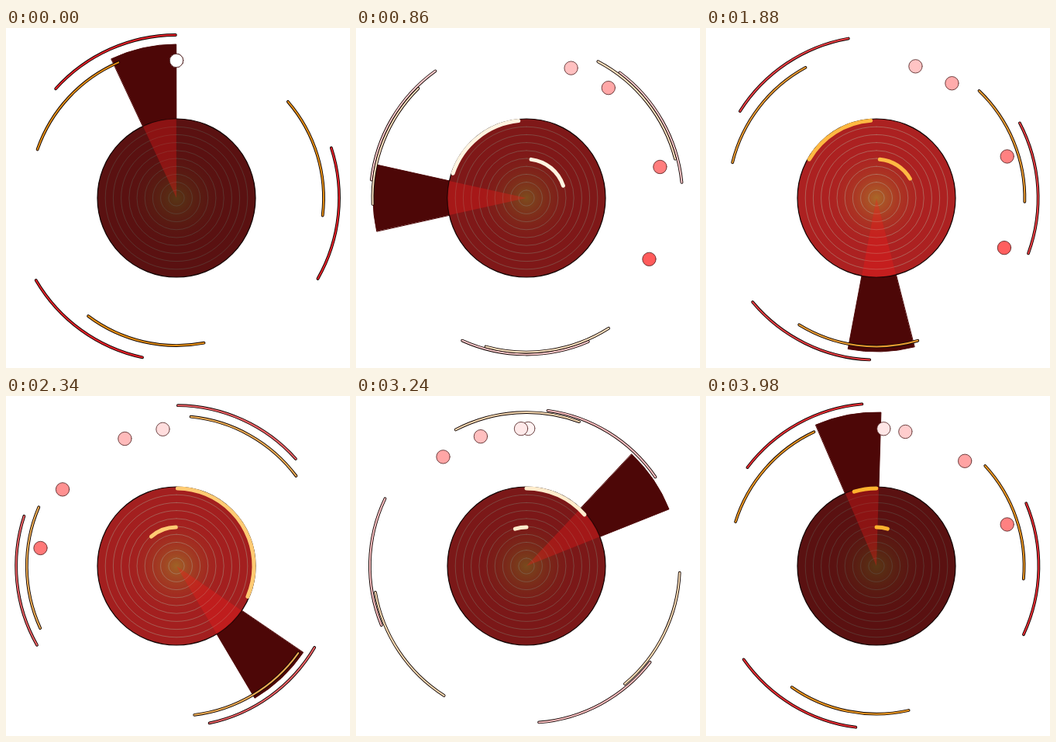
These frames come from a looping animation (444x438 px, 4000 ms). An HTML page with a canvas:

```html
<!DOCTYPE html>
<html lang="en">
<head>
<meta charset="utf-8">
<title>Radar loader</title>
<style>
  html, body { margin: 0; width: 100%; height: 100%; overflow: hidden; background: #fff; }
  canvas { display: block; }
</style>
</head>
<body>
<canvas id="stage" width="444" height="438"></canvas>
<script>
const ctx = document.getElementById('stage').getContext('2d');
const CX = 220, CY = 219, DISC = 102, SWEEP = 198;
const LOOP = 4000, BEAT = 1000, DOT_LAP = 1010, SPIN = 2 * DOT_LAP;
const DOT_DELAYS = [0, 60, 160, 240];

const rad = deg => (deg - 90) * Math.PI / 180;
const triangle = x => 1 - Math.abs(1 - 2 * x);
const mix = (a, b, k) => `rgb(${a.map((v, i) => Math.round(v + (b[i] - v) * k))})`;
const sine = x => (1 - Math.cos(Math.PI * x)) / 2;

// Cubic bezier easing with flat ends, solved by bisection
function flatBezier(x1, x2) {
  return x => {
    let lo = 0, hi = 1;
    for (let i = 0; i < 20; i++) {
      const s = (lo + hi) / 2, r = 1 - s;
      if (3 * s * r * r * x1 + 3 * s * s * r * x2 + s * s * s < x) lo = s;
      else hi = s;
    }
    return lo * lo * (3 - 2 * lo);
  };
}

// One uneven turn: early lead, soft ends and an optional second ripple
function unevenTurn(lead, soft, ripple) {
  return x => {
    const w = 2 * Math.PI * x;
    return x + lead * (1 - Math.cos(w)) - soft * Math.sin(w) - ripple * Math.sin(2 * w);
  };
}

const outerHead = flatBezier(0.46, 0.33);
const innerHead = flatBezier(0.75, 0.36);
const tail = x => sine(Math.max(0, 1.3 * (x - 0.318)));
const redTurn = unevenTurn(0.094, 0.08, 0);
const amberTurn = unevenTurn(0.155, 0.075, 0.05);

function fill(color) {
  ctx.fillStyle = color;
  ctx.fill();
}

function outline(color, width) {
  ctx.strokeStyle = color;
  ctx.lineWidth = width;
  ctx.stroke();
}

function arc(r, from, to) {
  ctx.beginPath();
  ctx.arc(CX, CY, r, rad(from), rad(to));
}

function sector(r, angle) {
  arc(r, angle - 25, angle);
  ctx.lineTo(CX, CY);
  ctx.closePath();
}

const glow = ctx.createRadialGradient(CX, CY, 0, CX, CY, 66);
glow.addColorStop(0, 'rgba(174,108,42,1)');
glow.addColorStop(1, 'rgba(178,34,34,0)');

function drawDisc(opacity) {
  arc(DISC, 0, 360);
  fill('#b22222');
  fill(glow);
  for (let k = 1; k < 10; k++) {
    arc(k * DISC / 10, 0, 360);
    outline('rgba(185,165,145,.5)', 1);
  }
  arc(DISC, 0, 360);
  fill(`rgba(0,0,0,${1 - opacity})`);
  outline('#100303', 1.2);
}

function drawTriple(r, start, color) {
  for (let i = 0; i < 3; i++) {
    arc(r, start + 120 * i, start + 120 * i + 47.6);
    outline('#120604', 3.8);
    outline(color, 2);
  }
}

function drawRunner(r, head, end, dir, color) {
  const from = 360 * end, to = 360 * head;
  if (to - from < 0.5) return;
  if (dir > 0) arc(r, from, to);
  else arc(r, -to, -from);
  outline(color, 5);
}

function drawDot(t) {
  const x = Math.max(0, t) % DOT_LAP / DOT_LAP;
  const a = rad(-360 * sine(x));
  ctx.beginPath();
  ctx.arc(CX + 177 * Math.cos(a), CY + 177 * Math.sin(a), 8.7, 0, 2 * Math.PI);
  fill(mix([255, 255, 255], [255, 42, 42], triangle(x)));
  outline('#4a1a1a', 0.8);
}

function draw(t) {
  const angle = -360 * t / LOOP;
  const spin = t % SPIN / SPIN, u = triangle(spin);
  const beat = t % BEAT / BEAT;

  ctx.fillStyle = '#fff';
  ctx.fillRect(0, 0, 444, 438);
  ctx.lineCap = 'round';

  sector(SWEEP, angle);
  fill('#4d0707');
  outline('#4d0707', 1);
  drawDisc(0.5 + 0.5 * triangle(t / LOOP));
  sector(DISC, angle);
  fill('rgba(255,23,23,.3)');

  drawTriple(210 - 10 * u, 360 * redTurn(spin) - 48, mix([228, 32, 40], [255, 232, 232], u));
  drawTriple(190 + 10 * u, 49.2 - 360 * amberTurn(spin), mix([228, 142, 20], [255, 240, 222], u));

  const gold = mix([255, 176, 42], [255, 255, 255], triangle(t % (2 * BEAT) / (2 * BEAT)));
  drawRunner(100, outerHead(beat), tail(beat), 1, gold);
  drawRunner(50, innerHead(beat), tail(beat), -1, gold);

  for (const delay of [...DOT_DELAYS].reverse()) drawDot(t - delay);
}

const began = performance.now();
function tick() {
  draw((performance.now() - began) % LOOP);
  requestAnimationFrame(tick);
}
tick();
</script>
</body>
</html>
```
